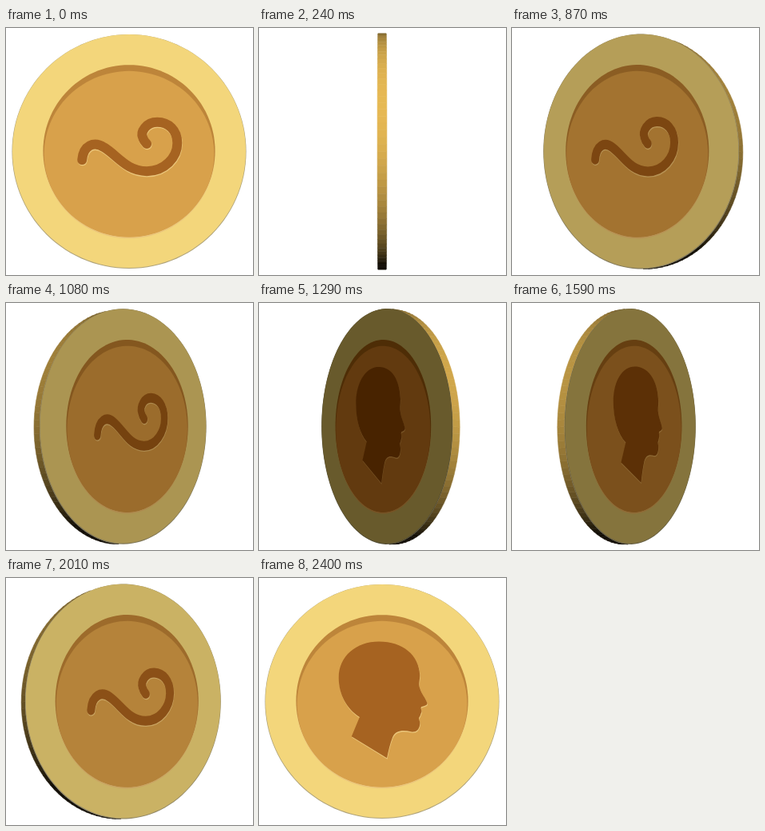
Recreate the animation shown at these times as an HTML page. Size 309 px wide and 309 px high, loop 2.43 s.

```html
<!DOCTYPE html>
<html lang="en">
<head>
<meta charset="utf-8">
<title>Spinning coin</title>
<style>
  html, body { margin: 0; width: 100%; height: 100%; overflow: hidden; background: #fff; }
  svg { display: block; width: 100vw; height: 100vh; }
</style>
</head>
<body>
<svg viewBox="0 0 309 309">
  <g id="edge" stroke-width=".6"></g>
  <g id="face"></g>
</svg>
<script>
const LOOP = 2430, STEP = 30, TURN = 11.25;
const CX = 154, CY = 154.5;
const R = 145.8, INNER = 107, HALF = 5, DIST = 958, SEGS = 120;
const LIGHT = [0.1, -0.35, 0.93];
const GOLD = [232, 186, 84];

// Each tone runs from facing the light to turned about 56 degrees away
const TONES = {
  bevel: [[176, 164, 124], [84, 78, 56]],
  ring: [[244, 215, 124], [111, 96, 48]],
  glow: [[236, 199, 124], [124, 88, 40]],
  wall: [[190, 134, 58], [84, 49, 9]],
  floor: [[217, 162, 76], [104, 63, 18]],
  mark: [[167, 100, 33], [77, 38, 0]]
};

const CURL = 'M95.5 165C97 147 110 141 123 149.5C140 160 151 179 176 179' +
  'C198 179 214 162 214 144C214 128 203 118 189 118C175 118 168 130 171 137C172 141 174 143 176 145';
const HEAD = 'M126 174C110 164 100 146 100 125C100 98 122 80 150 80C180 80 200 97 201 122' +
  'C201 128 199 133 201 138C203 145 208 150 210 156C211 159 207 160 203 161C201 163 204 165 203 168' +
  'C202 170 202 171 201 173C198 176 202 179 201 183C200 190 196 193 190 192C180 190 171 190 167 199' +
  'C164 207 162 215 160 225L116 198Z';

const NS = 'http://www.w3.org/2000/svg';
const edge = document.getElementById('edge');
const face = document.getElementById('face');

function add(parent) {
  return parent.appendChild(document.createElementNS(NS, 'path'));
}

const quads = Array.from({ length: SEGS }, () => add(edge));
const discs = [
  { tone: 'bevel', rx: R, ry: R, dy: 0 },
  { tone: 'ring', rx: R - 0.6, ry: R - 0.6, dy: -0.5 },
  { tone: 'glow', rx: INNER, ry: INNER, dy: 1.3 },
  { tone: 'wall', rx: INNER, ry: INNER, dy: -0.8 },
  { tone: 'floor', rx: INNER - 1.2, ry: INNER - 3.7, dy: 3.2 }
].map(d => ({ ...d, el: add(face) }));
const marks = [
  { tone: 'glow', dx: 0.5, dy: 1.3 },
  { tone: 'mark', dx: 0, dy: 0 }
].map(m => ({ ...m, el: add(face) }));

function rgb(c) {
  return 'rgb(' + c.map(v => Math.round(Math.max(0, Math.min(255, v)))).join(',') + ')';
}

function render(time) {
  const angle = 180 + Math.floor((time % LOOP) / STEP) * TURN;
  const half = Math.floor((angle + 90) / 180);
  const deg = angle - half * 180;
  const isHead = half % 2 === 0;
  const a = deg * Math.PI / 180, c = Math.cos(a), s = Math.sin(a);

  function project(x, y, z) {
    const w = DIST / (DIST + x * s - z * c);
    return [(x * c + z * s) * w, y * w];
  }

  // Edge strips between the front and back circles
  const rim = (i, z) => {
    const t = i / SEGS * 2 * Math.PI;
    const p = project(R * Math.cos(t), R * Math.sin(t), z);
    return [p[0] + CX, p[1] + CY + (z < 0 ? 1.2 * c : 0)];
  };
  quads.forEach((q, i) => {
    const p = [rim(i, HALF), rim(i + 1, HALF), rim(i + 1, -HALF), rim(i, -HALF)];
    let area = 0;
    p.forEach((u, k) => {
      const v = p[(k + 1) % 4];
      area += u[0] * v[1] - v[0] * u[1];
    });
    const shown = area < 0;
    q.style.display = shown ? '' : 'none';
    if (!shown) return;
    const t = (i + 0.5) / SEGS * 2 * Math.PI;
    const n = [Math.cos(t) * c, Math.sin(t), -Math.cos(t) * s];
    const lit = n.reduce((sum, v, k) => sum + v * LIGHT[k], 0);
    const col = rgb(GOLD.map(v => v * Math.max(0.08, Math.min(1, lit))));
    q.setAttribute('d', 'M' + p.map(u => u.map(v => v.toFixed(2))).join('L') + 'Z');
    q.setAttribute('fill', col);
    q.setAttribute('stroke', col);
  });

  const open = c > 0.01;
  face.style.display = open ? '' : 'none';
  if (!open) return;

  // The group is squeezed sideways, so strokes narrow with the turn
  face.setAttribute('transform', `matrix(${c},0,0,1,${CX},${CY})`);
  const place = (x, y) => {
    const p = project(x, y, HALF);
    return (p[0] / c).toFixed(2) + ' ' + p[1].toFixed(2);
  };
  const k = 1.95 * Math.pow(1 - Math.cos(a - 4 * Math.PI / 180), 0.9);
  const tone = name => {
    const [hi, lo] = TONES[name];
    return rgb(hi.map((v, i) => v + (lo[i] - v) * k));
  };

  for (const d of discs) {
    const pts = [];
    for (let i = 0; i < 120; i++) {
      const t = i / 60 * Math.PI;
      pts.push(place(d.rx * Math.cos(t), d.dy + d.ry * Math.sin(t)));
    }
    d.el.setAttribute('d', 'M' + pts.join('L') + 'Z');
    d.el.setAttribute('fill', tone(d.tone));
  }

  for (const m of marks) {
    const d = (isHead ? HEAD : CURL).replace(/([\d.]+) ([\d.]+)/g,
      (_, x, y) => place(+x - CX + m.dx, +y - CY + m.dy));
    const col = tone(m.tone);
    m.el.setAttribute('d', d);
    m.el.setAttribute('fill', isHead ? col : 'none');
    m.el.setAttribute('stroke', isHead ? 'none' : col);
    m.el.setAttribute('stroke-width', 12);
    m.el.setAttribute('stroke-linecap', 'round');
  }
}

const start = performance.now();
function tick() {
  render(performance.now() - start);
  requestAnimationFrame(tick);
}
tick();
</script>
</body>
</html>
```
